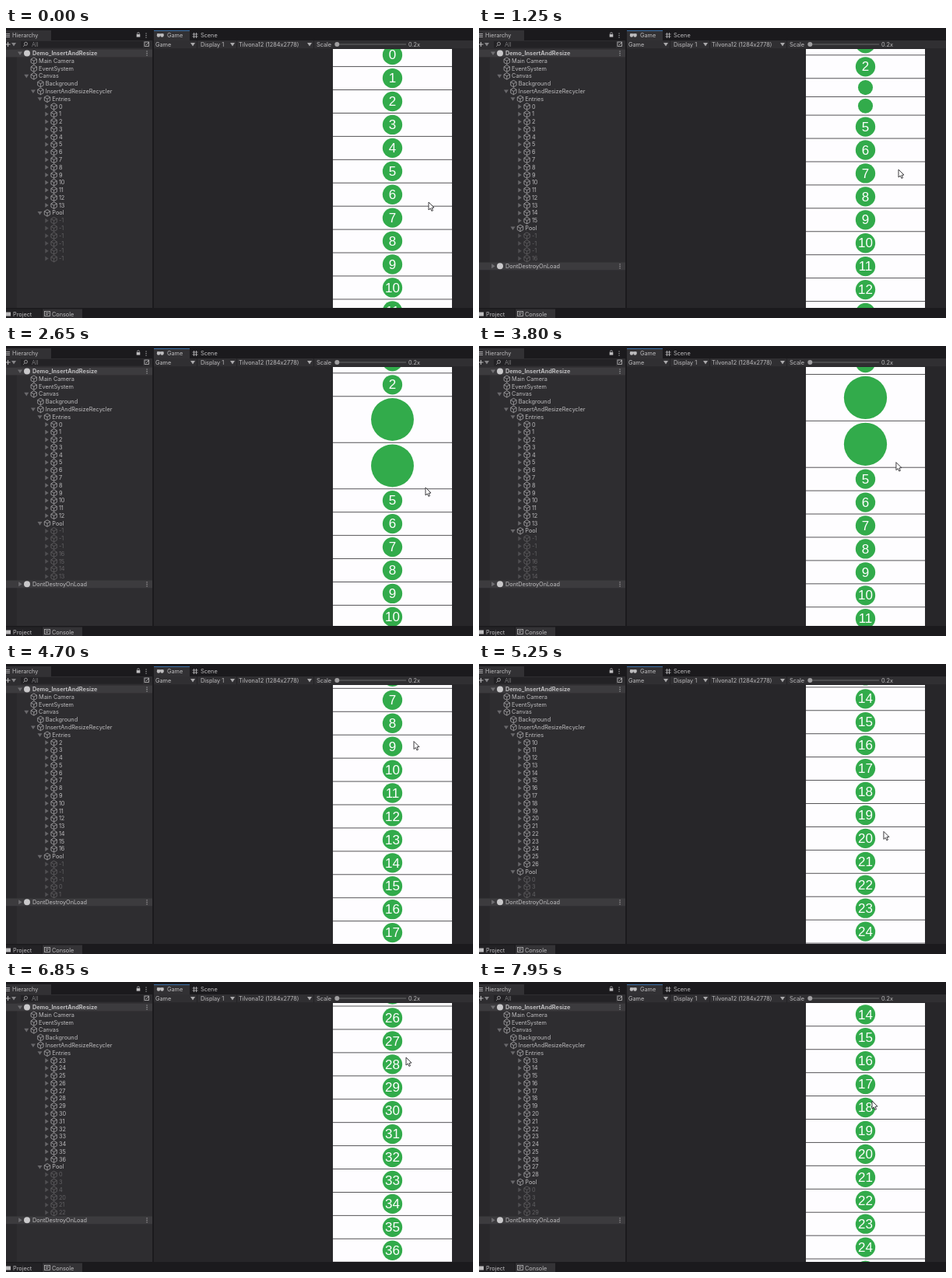
Write an HTML page with a canvas that moves like this. It is 600 by 373 pixels and loops after 8 s.

```html
<!DOCTYPE html>
<html lang="en">
<head>
<meta charset="utf-8">
<title>Insert and resize list</title>
<style>
html, body { margin: 0; width: 100%; height: 100%; overflow: hidden; background: #28272a; }
canvas { display: block; width: 600px; height: 373px; }
</style>
</head>
<body>
<canvas id="stage"></canvas>
<script>
const LOOP = 8000, STEP = 50;
const INSERT_AT = 805, GROW_TIME = 2000, REFRESH_LAG = 150;
const ROW = 29.93, FIRST_TOP = -25.03, LAST = 36;
const VIEW = { x: 420, top: 27, right: 573, bottom: 360 };
const TEXT = '#bdbcbe', DIM = '#626164', ICON = '#a9a8aa';

// [time, value] points, joined by smooth curves that never overshoot
const SCROLL = [[50, -44.7], [550, 0], [3350, 0], [4100, 50], [4400, 58], [4550, 112], [4700, 213],
  [5000, 370], [5350, 450], [5650, 620], [5800, 678], [6150, 782], [7000, 782], [7400, 650],
  [7800, 470], [7950, 427]];
const POINTER_X = [[50, 543], [550, 539], [3350, 539], [4700, 524], [5800, 517], [6850, 514], [7950, 505]];
const POINTER_Y = [[50, 224], [550, 182], [3350, 182], [4100, 132], [4400, 240], [4700, 99.5],
  [4900, 45], [5350, 240], [5800, 169], [6150, 110], [6500, 200], [6850, 97], [7000, 80],
  [7400, 200], [7600, 100], [7950, 153]];

const canvas = document.getElementById('stage');
const ctx = canvas.getContext('2d');
const ratio = window.devicePixelRatio || 1;
canvas.width = 600 * ratio;
canvas.height = 373 * ratio;
ctx.scale(ratio, ratio);
ctx.textBaseline = 'middle';

function sample(points, t) {
  const end = points.length - 1;
  if (t <= points[0][0]) return points[0][1];
  if (t >= points[end][0]) return points[end][1];
  const i = points.findIndex(p => p[0] > t) - 1;
  const slope = k => (points[k + 1][1] - points[k][1]) / (points[k + 1][0] - points[k][0]);
  const tangent = k => {
    if (k === 0 || k === end) return 0;
    const a = slope(k - 1), b = slope(k);
    return a * b <= 0 ? 0 : 2 * a * b / (a + b);
  };
  const [t0, v0] = points[i], [t1, v1] = points[i + 1];
  const d = t1 - t0, u = (t - t0) / d, w = 1 - u;
  return v0 * (1 + 2 * u) * w * w + v1 * u * u * (3 - 2 * u)
    + d * u * w * (tangent(i) * w - tangent(i + 1) * u);
}

// Rows of the list with their place on the stage
function layout(t) {
  const inserted = t >= INSERT_AT;
  const u = Math.min(1, Math.max(0, (t - INSERT_AT) / GROW_TIME));
  const grown = 2 * ROW * (1 - (1 - u) ** 2);
  let top = FIRST_TOP - sample(SCROLL, t);
  const rows = [];
  for (let index = 0; index <= LAST; index++) {
    const blank = inserted && (index === 3 || index === 4);
    const height = blank ? grown : ROW;
    rows.push({ index, blank, top, height });
    top += height;
  }
  return rows.filter(r => r.top + r.height > VIEW.top + .2 && r.top < VIEW.bottom - .2);
}

const range = (from, to) => Array.from({ length: Math.max(0, to - from + 1) }, (_, i) => from + i);

// Active and pooled names in the tree, which refreshes a little late
function entryNames(t) {
  const rows = layout(t);
  const low = Math.max(0, rows[0].index - 2);
  const high = Math.min(LAST, rows[rows.length - 1].index + 2);
  const active = range(low, high);
  let pool;
  if (high < 20) {
    const peak = t < INSERT_AT ? high : Math.max(high, 16);
    pool = [...Array(Math.max(0, 19 - peak)).fill(-1), ...range(0, low - 1),
      ...range(high + 1, peak).reverse()];
  } else {
    const spare = 17 - active.length;
    pool = [0, 3, 4, ...(t > 7000 ? range(high + 1, high + spare).reverse() : range(low - spare, low - 1))];
  }
  return { active, pool };
}

function rect(x, y, w, h, color) {
  ctx.fillStyle = color;
  ctx.fillRect(x, y, w, h);
}

function label(text, x, y, color = TEXT, font = '7.3px') {
  ctx.font = font + ' Inter, sans-serif';
  ctx.textAlign = 'left';
  ctx.fillStyle = color;
  ctx.fillText(text, x, y + .4);
}

function disc(x, y, r, color) {
  ctx.fillStyle = color;
  ctx.beginPath();
  ctx.arc(x, y, r, 0, 7);
  ctx.fill();
}

function shape(points, fill, stroke, width = .8) {
  ctx.beginPath();
  points.forEach(([x, y]) => ctx.lineTo(x, y));
  ctx.closePath();
  if (fill) { ctx.fillStyle = fill; ctx.fill(); }
  if (stroke) { ctx.strokeStyle = stroke; ctx.lineWidth = width; ctx.stroke(); }
}

function line(x1, y1, x2, y2, color, width = .8) {
  ctx.strokeStyle = color;
  ctx.lineWidth = width;
  ctx.beginPath();
  ctx.moveTo(x1, y1);
  ctx.lineTo(x2, y2);
  ctx.stroke();
}

function arrow(x, y, open, color) {
  shape(open ? [[x - 3, y - 2], [x + 3, y - 2], [x, y + 2.6]]
             : [[x - 1.8, y - 3], [x + 2.6, y], [x - 1.8, y + 3]], color);
}

function cube(x, y, color) {
  const corner = k => [x + 4.3 * Math.sin(k * Math.PI / 3), y - 4.3 * Math.cos(k * Math.PI / 3)];
  shape(range(0, 5).map(corner), null, color);
  [1, 3, 5].forEach(k => line(x, y, ...corner(k), color));
}

function kebab(x, y) {
  [-2.5, 0, 2.5].forEach(d => rect(x - .5, y + d - .5, 1.1, 1.1, TEXT));
}

const rowY = i => 32.5 + 9.78 * i;

function sceneRow(i, name, open, font) {
  const y = rowY(i);
  rect(0, y - 4.9, 188, 9.8, '#3c3b3e');
  arrow(18, y, open, '#6f6e71');
  disc(27, y, 4, '#c9c8ca');
  label(name, 34, y, TEXT, font);
  kebab(181, y);
}

function node(i, depth, name, state, dim) {
  const x = 33.5 + 8.6 * depth, y = rowY(i);
  if (state) arrow(x - 15.8, y, state === 'open', dim ? '#504f52' : '#69686b');
  cube(x - 6.3, y, dim ? DIM : ICON);
  label(name, x, y, dim ? DIM : TEXT);
}

function drawTree(t) {
  rect(0, 16, 188, 344, '#2e2d30');
  rect(0, 27, 14, 333, '#29282b');
  rect(0, 3, 58, 13, '#323134');
  [7.5, 9.5, 11.5].forEach(y => line(0, y, 5, y, TEXT));
  label('Hierarchy', 8, 9.5);
  ctx.strokeStyle = TEXT;
  ctx.lineWidth = .8;
  ctx.beginPath();
  ctx.arc(170, 7.5, 1.6, Math.PI, 0);
  ctx.stroke();
  rect(167.7, 8, 4.6, 3.6, TEXT);
  kebab(180, 9.5);

  line(0, 21, 5.5, 21, TEXT, 1);
  line(2.5, 18, 2.5, 24, TEXT, 1);
  arrow(10, 21, true, '#858487');
  rect(19, 17, 157, 8.5, '#232225');
  ctx.strokeStyle = '#99989a';
  ctx.beginPath();
  ctx.arc(25.5, 20.3, 2, 0, 7);
  ctx.stroke();
  line(24, 22, 22, 24, '#99989a');
  label('All', 33, 21, '#79787b');
  ctx.strokeStyle = TEXT;
  ctx.strokeRect(178, 18, 5.5, 5.5);
  line(180, 22, 184, 18, TEXT);

  sceneRow(0, 'Demo_InsertAndResize', true, 'bold 7.3px');
  node(1, 1, 'Main Camera');
  node(2, 1, 'EventSystem');
  node(3, 1, 'Canvas', 'open');
  node(4, 2, 'Background');
  node(5, 2, 'InsertAndResizeRecycler', 'open');
  node(6, 3, 'Entries', 'open');
  const { active, pool } = entryNames(Math.max(0, t - REFRESH_LAG));
  let i = 7;
  active.forEach(n => node(i++, 4, n, 'closed'));
  node(i++, 3, 'Pool', 'open');
  pool.forEach(n => node(i++, 4, n, 'closed', true));
  if (t >= 800) sceneRow(28, 'DontDestroyOnLoad', false);
}

function drawToolbar() {
  rect(190, 3, 46, 13, '#323134');
  rect(190, 3, 46, 1, '#3c71a8');
  rect(190, 16, 410, 10.5, '#302f32');
  disc(196, 9.5, 2.2, TEXT);
  disc(200.5, 9.5, 2.2, TEXT);
  rect(194, 7.3, 8.5, 2, TEXT);
  label('Game', 207, 9.5);
  [241.5, 244.5].forEach(x => line(x, 6, x, 13, TEXT));
  [8, 11].forEach(y => line(239.5, y, 246.5, y, TEXT));
  label('Scene', 250, 9.5);

  [['Game', 192, 240], ['Display 1', 250, 291], ['Tilvona12 (1284x2778)', 299, 390]].forEach(([name, x, caret]) => {
    label(name, x, 21);
    arrow(caret, 21, true, ICON);
    rect(caret + 5, 16, 1, 10.5, '#232225');
  });
  label('Scale', 399, 21);
  line(425, 21, 514, 21, '#69686b', 1);
  disc(425.3, 21, 3, '#a09fa1');
  label('0.2x', 517, 21);
}

function drawFooter() {
  rect(0, 360, 600, 13, '#1b1a1d');
  rect(0, 361.5, 46, 12, '#232225');
  rect(47, 361.5, 51, 12, '#343336');
  rect(0, 365.5, 6, 5, TEXT);
  label('Project', 9, 368);
  ctx.strokeStyle = TEXT;
  ctx.lineWidth = .8;
  ctx.strokeRect(49.5, 364.5, 7, 6);
  line(51, 366.5, 55, 366.5, TEXT);
  line(51, 368.5, 54, 368.5, TEXT);
  label('Console', 59, 368);
}

function drawList(t) {
  const width = VIEW.right - VIEW.x, center = VIEW.x + width / 2;
  ctx.save();
  ctx.beginPath();
  ctx.rect(VIEW.x, VIEW.top, width, VIEW.bottom - VIEW.top);
  ctx.clip();
  rect(VIEW.x, VIEW.top, width, VIEW.bottom - VIEW.top, '#fefdff');
  ctx.textAlign = 'center';
  ctx.font = '17px "Liberation Sans", Arial, sans-serif';
  layout(t).forEach(({ index, blank, top, height }) => {
    const y = top + height / 2;
    disc(center, y, Math.max(0, height / 2 - 2.3), '#32ab4b');
    ctx.fillStyle = '#fff';
    if (!blank) ctx.fillText(index, center, y + 1);
    rect(VIEW.x, top + height - .5, width, 1, '#555457');
  });
  ctx.restore();
}

function drawPointer(t) {
  const x = sample(POINTER_X, t), y = sample(POINTER_Y, t);
  const outline = [[0, 0], [0, 10], [2.3, 8], [3.9, 11.4], [5.5, 10.7], [4, 7.3], [7, 7]];
  shape(outline.map(([dx, dy]) => [x + dx, y + dy]), '#fff', '#29282b', .9);
}

function draw(t) {
  rect(0, 0, 600, 373, '#1b1a1d');
  rect(190, 26.5, 410, 333.5, '#272629');
  drawTree(t);
  drawToolbar();
  drawList(t);
  drawFooter();
  drawPointer(t);
}

const start = performance.now();
function tick() {
  const elapsed = (performance.now() - start) % LOOP;
  draw(Math.floor(elapsed / STEP) * STEP);
  requestAnimationFrame(tick);
}
tick();
</script>
</body>
</html>
```
